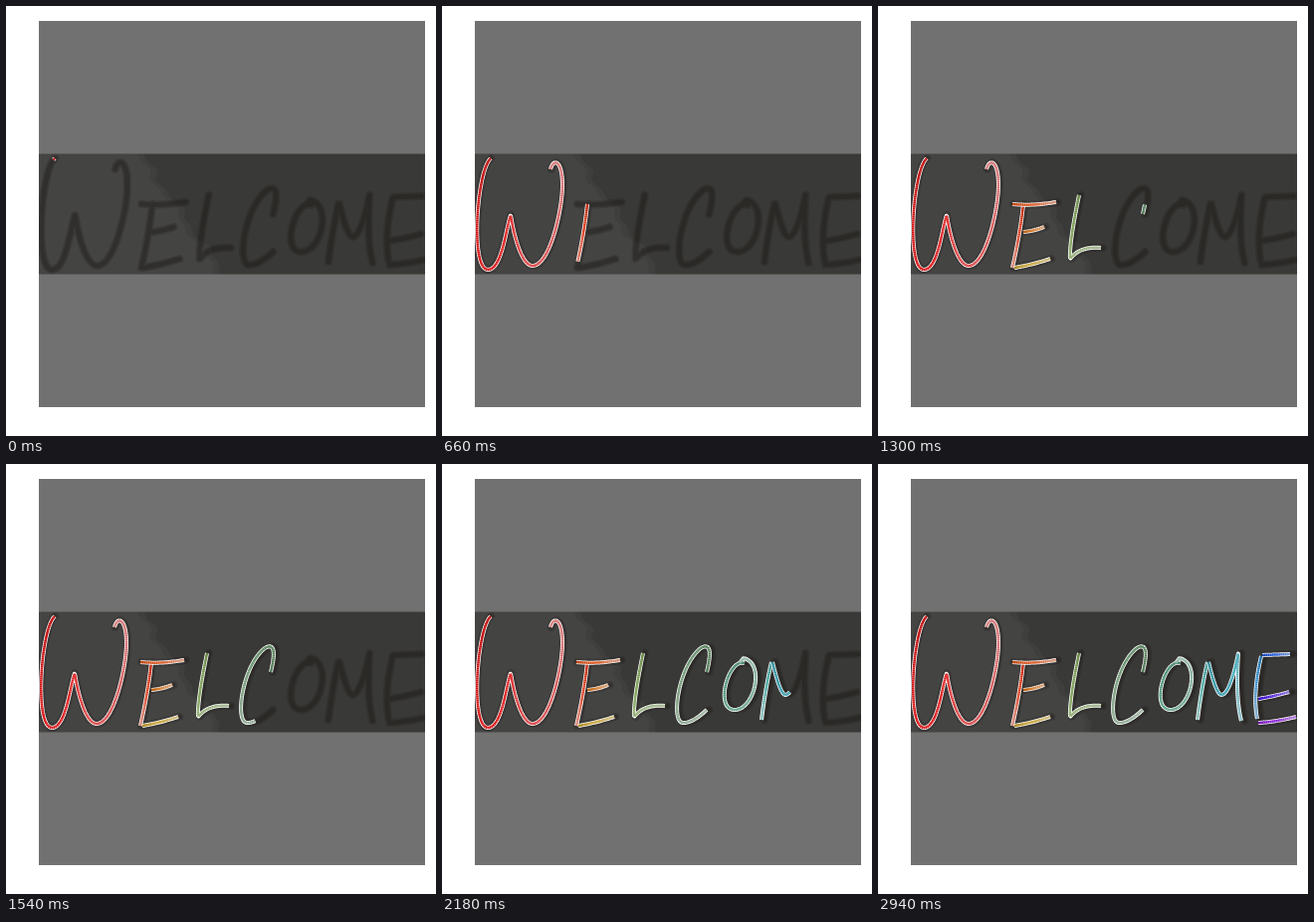
These frames come from a looping animation (432x432 px, 2.96 s). An HTML page with a canvas:

```html
<!DOCTYPE html>
<html lang="en">
<head>
<meta charset="utf-8">
<title>Welcome</title>
<style>
  html, body { margin: 0; width: 100%; height: 100%; overflow: hidden; background: #fff; }
  canvas { display: block; width: 432px; height: 432px; }
</style>
</head>
<body>
<canvas id="stage" width="432" height="432"></canvas>
<script>
const LOOP = 2960, STEP = 20, LIFT = 20;
const LEFT = 33, TOP = 148, WIDE = 388, HIGH = 122;
const ctx = document.getElementById('stage').getContext('2d');

// Each letter: when the pen reaches it, then its strokes as hue and curve.
const letters = [
  { at: 0, strokes: [
    [0, 'M49,153 C35,165 28,264 46,265 C60,265 64,225 69,210 C72,230 80,261 91,261 C108,261 121,205 121,180 C121,155 112,152 109,164']] },
  { at: 500, strokes: [
    [10, 'M146,199 Q143,228 135,263'],
    [18, 'M135,199 Q155,201 179,197'],
    [28, 'M146,227 Q157,226 167,222'],
    [45, 'M137,263 Q155,260 173,254']] },
  { at: 1040, strokes: [
    [88, 'M202,190 Q192,238 193,254 Q203,241 224,243']] },
  { at: 1280, strokes: [
    [128, 'M266,209 C272,185 268,180 260,185 C237,203 229,262 243,260 Q252,260 266,247']] },
  { at: 1600, strokes: [
    [158, 'M304,200 C288,194 273,247 294,247 C314,247 325,200 303,195 L299,200']] },
  { at: 1940, strokes: [
    [175, 'M331,199 Q325,225 321,257'],
    [188, 'M332,199 C336,216 341,232 345,232 C352,232 358,210 362,190 Q359,235 365,258']] },
  { at: 2440, strokes: [
    [205, 'M385,193 Q376,231 381,256'],
    [222, 'M386,192 L414,191'],
    [255, 'M382,236 Q400,233 413,229'],
    [275, 'M382,260 Q400,259 420,254']] }
];

// Within a letter, time is shared by stroke length, with a short lift after each.
const pens = letters.flatMap(({ at, strokes }, i) => {
  const until = i + 1 < letters.length ? letters[i + 1].at : LOOP;
  const list = strokes.map(([hue, d]) => {
    const curve = document.createElementNS('http://www.w3.org/2000/svg', 'path');
    curve.setAttribute('d', d);
    return { hue, d, curve, length: curve.getTotalLength() };
  });
  const total = list.reduce((sum, p) => sum + p.length, 0);
  const speed = total / (until - at - LIFT * list.length);
  let start = at;
  for (const p of list) {
    p.start = start;
    p.speed = speed;
    start += p.length / speed + LIFT;
  }
  return list;
});

// Strong colour at the start of a stroke, paler towards its end.
function ink(hue, u) {
  const vivid = 55 + 35 * Math.cos(hue / 250 * 2 * Math.PI);
  return `hsl(${hue}, ${vivid * (1 - 0.4 * u)}%, ${39 + 28 * u}%)`;
}

function line(from, to, width, color) {
  ctx.beginPath();
  ctx.moveTo(from.x, from.y);
  ctx.lineTo(to.x, to.y);
  ctx.lineWidth = width;
  ctx.strokeStyle = color;
  ctx.stroke();
}

// Area left of a slanted, ragged edge.
function patch(g, color, shift) {
  g.beginPath();
  g.moveTo(LEFT, TOP);
  for (let y = 0; y <= HIGH; y += 2) {
    g.lineTo(134 + shift + 0.69 * y + 3 * Math.sin(y / 7) + 2 * Math.sin(y / 3 + shift), TOP + y);
  }
  g.lineTo(LEFT, TOP + HIGH);
  g.fillStyle = color;
  g.fill();
}

function makeBoard() {
  const board = document.createElement('canvas');
  board.width = board.height = 432;
  const g = board.getContext('2d');
  const box = (color, ...r) => { g.fillStyle = color; g.fillRect(...r); };
  box('#fff', 0, 0, 432, 432);
  box('#717171', LEFT, 15, WIDE, 388);
  box('#393937', LEFT, TOP, WIDE, HIGH);
  patch(g, '#3f3f3d', 2);
  patch(g, '#444442', -4);

  // Faint dark lettering, set slightly wider than the pen line.
  g.save();
  g.beginPath();
  g.rect(LEFT, TOP, WIDE, HIGH);
  g.clip();
  g.translate(LEFT, 0);
  g.scale(1.01, 1);
  g.translate(-LEFT, 0);
  g.lineCap = g.lineJoin = 'round';
  const all = new Path2D(pens.map(p => p.d).join(' '));
  for (const [width, alpha] of [[8, 0.2], [4.5, 0.25]]) {
    g.lineWidth = width;
    g.strokeStyle = `rgba(22, 17, 15, ${alpha})`;
    g.stroke(all);
  }
  g.restore();

  // Soft upper and lower rims.
  box('#717171', LEFT, TOP, WIDE, 0.5);
  box('#717171', LEFT, TOP + HIGH - 0.5, WIDE, 0.5);
  return board;
}

function drawPen(p, time) {
  const reach = Math.min(Math.max(2, (time - p.start) * p.speed), p.length);
  const count = Math.ceil(reach / 2);
  const pts = Array.from({ length: count + 1 }, (_, i) => p.curve.getPointAtLength(reach * i / count));

  ctx.beginPath();
  pts.forEach(q => ctx.lineTo(q.x, q.y));
  ctx.lineWidth = 4;
  ctx.strokeStyle = '#fff';
  ctx.stroke();

  for (let i = 0; i < count; i++) {
    line(pts[i], pts[i + 1], 2.5, ink(p.hue, reach * i / count / p.length));
  }
}

const board = makeBoard();
ctx.lineJoin = 'round';
const begin = performance.now();

function frame() {
  const time = Math.floor(((performance.now() - begin) % LOOP) / STEP) * STEP;
  ctx.drawImage(board, 0, 0);
  pens.filter(p => time >= p.start).forEach(p => drawPen(p, time));
  requestAnimationFrame(frame);
}
frame();
</script>
</body>
</html>
```
